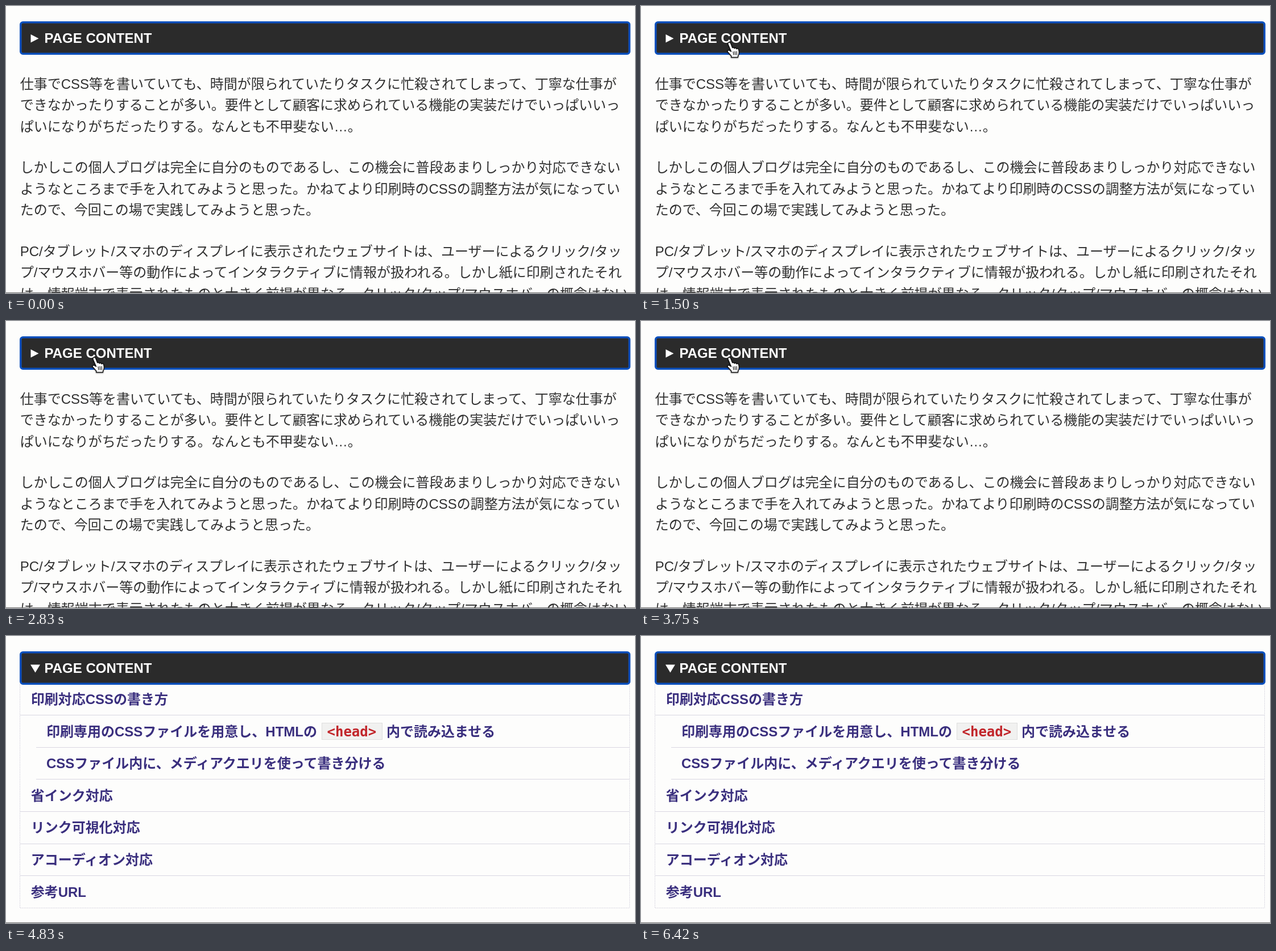
Write an HTML page that moves like this. It is 1106x506 px and loops after 6460 ms.

```html
<!DOCTYPE html>
<html lang="ja">
<head>
<meta charset="utf-8">
<title>Page content accordion</title>
<style>
  html, body { margin: 0; width: 100%; height: 100%; overflow: hidden; background: #fdfdfc; }
  svg { display: block; }
  text {
    font: 24px "Liberation Sans", "Noto Sans CJK JP", "Noto Sans CJK", sans-serif;
    fill: #303030;
    white-space: pre;
    text-spacing-trim: space-all;
  }
  .heading, .item { font-weight: bold; }
  .heading { fill: #fff; }
  .item { fill: #3a2f7e; }
  .code { font: bold 24px "DejaVu Sans Mono", monospace; fill: #c2262b; }
  .rule { stroke: #d9d7e2; fill: none; }
</style>
</head>
<body>
<svg width="1106" height="506" viewBox="0 0 1106 506">
  <g id="article"></g>
  <g id="contents">
    <path class="rule" d="M24.5 84V479.5H1096.5V84" stroke-dasharray="2 1"/>
  </g>
  <rect x="25.75" y="28.75" width="1070.5" height="55.5" rx="4" fill="#2b2b2b" stroke="#0a50bd" stroke-width="3.5"/>
  <path id="marker" fill="#fff"/>
  <text class="heading" x="67.5" y="65.3">PAGE CONTENT</text>
  <path d="M0 505.5H1106" stroke="#707070"/>
  <g id="hand" stroke="#111" stroke-width="1.5" stroke-linejoin="round" stroke-linecap="round"
     style="filter: drop-shadow(0 1.5px 1px #0006)">
    <path fill="#fff" d="M3.5 1C1.2 1.4 1 3.4 1.8 5.3L7 17.2L4.4 15.6C2 14.2-.3 15.8 1 18L7.2 25V27.5H18.8L19.3 24.6C21.6 21.5 21 17 20.2 13.8C19.6 11.7 17.4 11.6 16.6 12.8C16 10.8 13.6 10.6 12.8 11.8C12 10.1 10.2 9.8 9.3 10.6L6.2 2.8C5.6 1.4 4.8.8 3.5 1Z"/>
    <path fill="none" stroke-width="1.2" d="M10.6 17.5L11.4 23M13.6 17.2L14.2 23M16.6 17L17 23"/>
  </g>
</svg>
<script>
const LOOP = 6460;
const TOGGLES = [1640, 2500, 3870];
const MARKERS = { open: "M43 50.5H60L51.5 64.5Z", closed: "M43.5 50V64.5L57.5 57.2Z" };

// Hand position over time: [ms, x, y]
const HAND_PATH = [
  [600, 240, 506], [900, 160, 69], [1000, 160, 69], [1250, 151.5, 63],
  [4200, 151.5, 63], [4450, 190, -32]
];

const PARAGRAPHS = [
  ["仕事でCSS等を書いていても、時間が限られていたりタスクに忙殺されてしまって、丁寧な仕事が",
   "できなかったりすることが多い。要件として顧客に求められている機能の実装だけでいっぱいいっ",
   "ぱいになりがちだったりする。なんとも不甲斐ない…。"],
  ["しかしこの個人ブログは完全に自分のものであるし、この機会に普段あまりしっかり対応できない",
   "ようなところまで手を入れてみようと思った。かねてより印刷時のCSSの調整方法が気になってい",
   "たので、今回この場で実践してみようと思った。"],
  ["PC/タブレット/スマホのディスプレイに表示されたウェブサイトは、ユーザーによるクリック/タッ",
   "プ/マウスホバー等の動作によってインタラクティブに情報が扱われる。しかし紙に印刷されたそれ",
   "は、情報端末で表示されたものと大きく前提が異なる。クリック/タップ/マウスホバーの概念はない"]
];

const ITEMS = [
  { text: "印刷対応CSSの書き方" },
  { text: "印刷専用のCSSファイルを用意し、HTMLの", nested: true, code: "<head>", rest: "内で読み込ませる" },
  { text: "CSSファイル内に、メディアクエリを使って書き分ける", nested: true },
  { text: "省インク対応" },
  { text: "リンク可視化対応" },
  { text: "アコーディオン対応" },
  { text: "参考URL" }
];

const byId = id => document.getElementById(id);
const article = byId("article"), contents = byId("contents");
const marker = byId("marker"), hand = byId("hand");

function add(parent, tag, attributes, text = "") {
  const node = document.createElementNS("http://www.w3.org/2000/svg", tag);
  for (const name in attributes) node.setAttribute(name, attributes[name]);
  node.textContent = text;
  parent.append(node);
}

PARAGRAPHS.forEach((lines, p) => lines.forEach((line, i) =>
  add(article, "text", { x: 24.7, y: 145.7 + p * 147.4 + i * 37.6 }, line)));

ITEMS.forEach(({ text, nested, code, rest }, i) => {
  const y = 120 + i * 56.6;
  const put = (x, string, style = "item") => add(contents, "text", { x, y, class: style }, string);
  put(nested ? 71 : 43.7, text);
  if (code) {
    add(contents, "rect", { x: 555.5, y: 153.5, width: 106, height: 29, fill: "#f1f1f0", stroke: "#dedede" });
    put(564.5, code, "code");
    put(669, rest);
  }
  const ruleY = Math.floor(139.6 + i * 56.6) + 0.5;
  const nextNested = ITEMS[i + 1]?.nested;
  if (i < ITEMS.length - 1)
    add(contents, "path", { class: "rule", d: `M${nested || (nextNested && nested) ? 53 : 25} ${ruleY}H1096` });
});

function handAt(time) {
  const next = HAND_PATH.findIndex(([at]) => at > time);
  if (next < 1) return null;
  const [t0, x0, y0] = HAND_PATH[next - 1], [t1, x1, y1] = HAND_PATH[next];
  const u = (time - t0) / (t1 - t0), eased = u * u * (3 - 2 * u);
  return [x0 + (x1 - x0) * eased, y0 + (y1 - y0) * eased];
}

function draw(now) {
  const time = now % LOOP;
  const open = TOGGLES.filter(at => time >= at).length % 2 === 1;
  article.style.display = open ? "none" : "";
  contents.style.display = open ? "" : "none";
  marker.setAttribute("d", open ? MARKERS.open : MARKERS.closed);

  const position = handAt(time);
  hand.style.display = position ? "" : "none";
  if (position) hand.setAttribute("transform", `translate(${position})`);
}

const start = performance.now();
function tick() {
  draw(performance.now() - start);
  requestAnimationFrame(tick);
}
tick();
</script>
</body>
</html>
```
